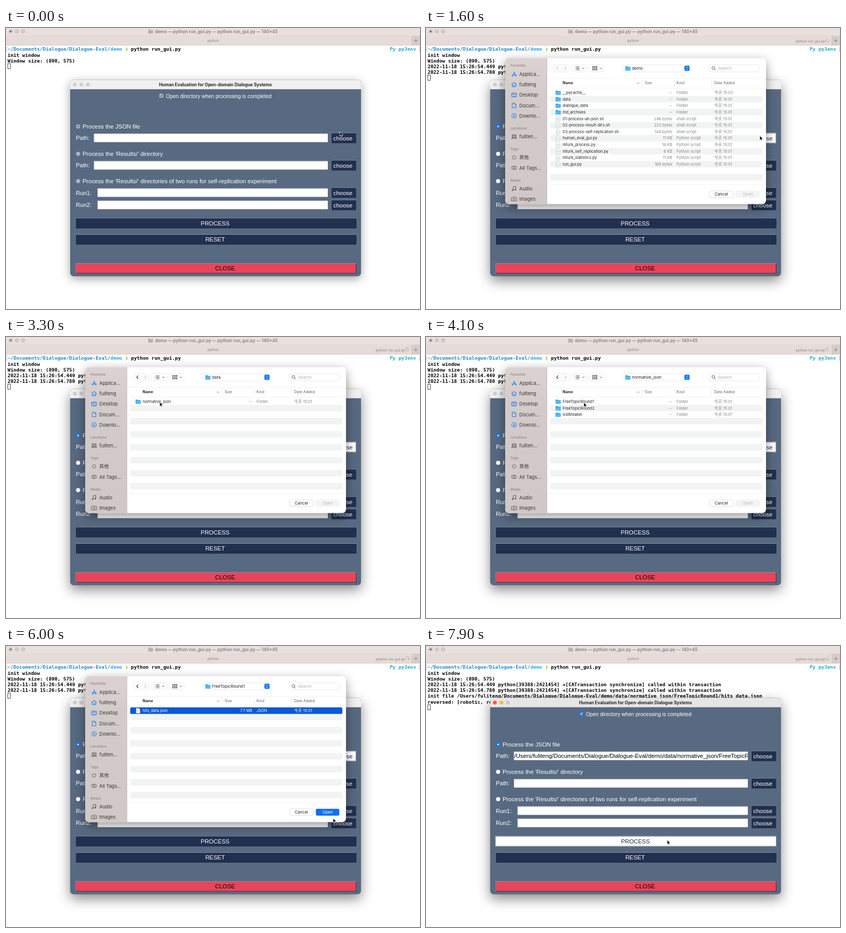
Write an HTML page that moves like this. It is 800 px wide and 545 px high and loops after 8 s.

```html
<!DOCTYPE html>
<html lang="en">
<head>
<meta charset="utf-8">
<title>Dialogue evaluation demo</title>
<style>
  html, body { margin: 0; width: 100%; height: 100%; overflow: hidden; background: #fff; }
  svg { display: block; width: 800px; height: 545px; }
  text { font-family: Inter, "Noto Sans CJK SC", "Noto Sans CJK", sans-serif; white-space: pre; }
  .mono { font: bold 9.44px "DejaVu Sans Mono", monospace; }
  .gui { font: 11.36px "Liberation Sans", Arial, sans-serif; fill: #fff; }
  .note { font-size: 10.1px; }
  .dark { fill: #1c2a48; }
  .title { font-size: 8.25px; font-weight: 700; }
  .tab { font-size: 6.8px; fill: #8d8583; }
  .side { font-size: 9.2px; fill: #3a3534; }
  .label { font-size: 6.7px; font-weight: 600; fill: #968d8b; }
  .row { font-size: 7.5px; fill: #222; }
  .dim { fill: #858585; }
  .head { font-size: 7.1px; fill: #606060; }
  .ui { font-size: 7.9px; fill: #222; }
  .mid { text-anchor: middle; }
  .end { text-anchor: end; }
  .line { fill: none; stroke-linecap: round; stroke-linejoin: round; }
  .idle { filter: drop-shadow(0 5px 9px rgba(0,0,0,.36)); }
  .front { filter: drop-shadow(0 9px 12px rgba(0,0,0,.46)); }
  .sheet { filter: drop-shadow(0 6px 10px rgba(0,0,0,.42)); }
</style>
</head>
<body>
<svg id="stage" viewBox="0 0 800 545"></svg>
<script>
const LOOP = 8000, STEP = 100;
const USER = 'fuliteng';
const T = { focus: 500, choose: 1200, second: 1500, open: 1600, pickData: 2700, data: 2900,
  pickNorm: 3400, norm: 3600, pickRound: 4400, round: 4600, pickHits: 5000,
  shut: 6400, path: 7000, run: 7600 };

// Shape helpers
const text = (x, y, s, cls, extra = '') => `<text x="${x}" y="${y}" class="${cls}" ${extra}>${s}</text>`;
const rect = (x, y, w, h, fill, extra = '') =>
  `<rect x="${x}" y="${y}" width="${w}" height="${h}" fill="${fill}" ${extra}/>`;
const dot = (x, y, r, fill, extra = '') => `<circle cx="${x}" cy="${y}" r="${r}" fill="${fill}" ${extra}/>`;
const line = (d, color, w = 1) => `<path class="line" d="${d}" stroke="${color}" stroke-width="${w}"/>`;
const during = (spans, body) => `<g data-on="${spans}">${body}</g>`;
const span = (from, to = LOOP) => `${from}-${to}`;

// Terminal
const rowY = i => 44.3 + 11.22 * i;
const out = (i, s) => text(3, rowY(i), s, 'mono');
const caret = (i, from, to) =>
  during(span(from, to), rect(3.5, rowY(i) - 9, 5, 10, 'none', 'stroke="#333" stroke-width=".9"'));
const call = ms => `2022-11-18 15:26:54.${ms} python[39388:2421454] +[CATransaction synchronize] called within transaction`;

function terminal() {
  const spokes = Array.from({ length: 8 }, (_, i) =>
    `<path d="M776 22.2V20" stroke="#7d7573" stroke-width=".9" opacity="${.25 + i * .1}" transform="rotate(${i * 45} 776 24.3)"/>`).join('');
  return rect(0, 0, 800, 545, '#fff') + rect(0, 0, 800, 34, '#e5dbd9') + rect(0, 0, 800, 14, '#e9e0de') +
    rect(785, 15, 15, 19, '#d6ccca') + rect(784, 15, .7, 19, '#c3b9b7') + rect(0, 33.5, 800, .6, '#d2c8c6') +
    [9, 21, 33].map(x => dot(x, 6.6, 3.6, '#d3c9c7', 'stroke="#bdb3b1" stroke-width=".6"')).join('') +
    dot(9, 6.6, 1.5, '#4f4847') +
    '<path d="M275 3h3.5l1 1.2h4.500v6.600h-9z" fill="#b9afad"/>' +
    text(406.5, 9.7, 'demo — python run_gui.py — python run_gui.py — 140×45', 'title mid', 'fill="#908886"') +
    text(400.5, 27, 'python', 'tab mid') +
    line('M789 24.500h6M792 21.500v6', '#7d7573', .8) +
    during(span(T.second), text(714.5, 27.5, 'python run_gui.py', 'tab', 'style="font-size:6.7px"') + `<g id="spin">${spokes}</g>`) +
    line('M2.5 37H1v8h1.500M798 37h1.500v8h-1.500', '#b0b0b0', .8) +
    text(3, rowY(0), '~/Documents/Dialogue/Dialogue-Eval/', 'mono', 'fill="#2089cf"') +
    text(201.8, rowY(0), 'demo', 'mono', 'fill="#30a5ee"') +
    text(230.2, rowY(0), '❯', 'mono', 'fill="#6cc02c"') +
    text(241.5, rowY(0), 'python run_gui.py', 'mono') +
    text(741.4, rowY(0), 'Py py3env', 'mono', 'fill="#28a9c8"') +
    out(1, 'init window') + out(2, 'Window size: (890, 575)') +
    during(span(T.choose), out(3, call(449))) +
    during(span(T.second), out(4, call(780))) +
    during(span(T.run), out(5, `init file /Users/${USER}/Documents/Dialogue/Dialogue-Eval/demo/data/normative_json/FreeTopicRound1/hits_data.json`) +
      out(6, 'reversed: [robotic, re')) +
    caret(3, 0, T.choose) + caret(4, T.choose, T.second) + caret(5, T.second, T.run) + caret(7, T.run);
}

// Form window
function button(x, y, w, label, fill = '#21304f', cls = 'gui') {
  return rect(x, y, w, 20, '#909baa') + rect(x + .8, y + .8, w - .8, 19.2, '#18233b') +
    rect(x + .8, y + .8, w - 1.6, 18.4, fill) + text(x + w / 2 - 1.4, y + 14, label, cls + ' mid');
}
const pressed = (x, y, w, label) =>
  rect(x - .5, y - .3, w + .5, 20.6, '#a9a9a9') + rect(x + 1, y + 1.200, w - 2, 17.6, '#fff') +
  text(x + w / 2 - .8, y + 14.3, label, 'gui dark mid');
const input = (x, y) => rect(x - .5, y - .5, 622.5 - x, 17, '#a6a6a6') + rect(x + .4, y + .4, 621.4 - x, 15.8, '#fff');
const choose = y => button(628, y, 48.6, 'choose');
const lights = colors => colors.map((c, i) => dot(133 + i * 12.6, 109.7, 3.8, c)).join('');
const frame = cls => `<rect class="${cls}" x="124" y="100.500" width="562" height="381" rx="6.500" fill="#586a82"/>`;
const bar = fill => `<path d="M124 118.700V107a6.500 6.500 0 0 1 6.500-6.500h549a6.500 6.500 0 0 1 6.500 6.500v11.700z" fill="${fill}"/>`;

function controls(on, off, mark) {
  return rect(296.3, 127.5, 7.800, 7.800, on, 'rx="1.700"') + line('M298.300 131.500l1.400 1.700 2.500-3.800', mark, 1.100) +
    dot(139.4, 191, 4, on) + dot(139.4, 191, 1.5, mark) + dot(139.4, 244, 4, off) + dot(139.4, 297, 4, off);
}

function form() {
  const active = `${span(T.focus, T.second)},${span(T.path)}`;
  const inactive = `${span(0, T.focus)},${span(T.second, T.path)}`;
  const grey = '#d0cecf';
  return during(span(0, T.focus), frame('idle')) + during(span(T.focus), frame('front')) +
    during(inactive, bar('#f1f0f0') + lights([grey, grey, grey])) +
    during(active, bar('#e8e5e6') + lights(['#fc5b54', '#fdba2d', '#cbc8c9'])) +
    text(404.8, 112.6, 'Human Evaluation for Open-domain Dialogue Systems', 'title mid', 'fill="#222"') +
    during(span(0, T.focus), controls('#abb3bd', '#abb3bd', '#5d6876')) +
    during(span(T.focus), controls('#1479f3', '#fff', '#fff')) +
    text(309, 135.8, 'Open directory when processing is completed', 'gui note') +
    text(148, 195.3, 'Process the JSON file', 'gui') +
    text(135, 217.3, 'Path:', 'gui') + input(170, 205) + choose(203.5) +
    text(148, 248.4, "Process the 'Results/' directory", 'gui') +
    text(135, 270.4, 'Path:', 'gui') + input(170, 258.2) + choose(256.5) +
    text(148, 301.3, "Process the 'Results/' directories of two runs for self-replication experiment", 'gui') +
    text(135, 323.6, 'Run1:', 'gui') + input(177, 311.200) + choose(309.5) +
    text(135, 347.3, 'Run2:', 'gui') + input(177, 335) + choose(333.5) +
    button(134, 368.7, 543, 'PROCESS') + button(134, 400.2, 543, 'RESET') +
    button(134, 456.200, 543, 'CLOSE', '#e8455a', 'gui" style="fill:#000" data-k="') +
    during(span(T.choose, T.path), pressed(628, 203.5, 48.6, 'choose')) +
    during(span(T.path), `<g clip-path="url(#field)">` +
      text(170.7, 217.1, `/Users/${USER}/Documents/Dialogue/Dialogue-Eval/demo/data/normative_json/FreeTopicRound1/hits_data.json`, 'gui', 'style="fill:#000"') + '</g>') +
    during(span(T.run), pressed(134, 368.7, 543, 'PROCESS'));
}

// File chooser
const folder = (x, y) => `<path d="M${x} ${y - 4}h3.800l1 1.200h5v7h-9.800z" fill="#2f9fe0"/>` +
  rect(x, y - 1.6, 9.8, 5.8, '#56b9f1', 'rx=".8"');
const sheet = (x, y) => `<path d="M${x} ${y - 4.700}h5l2.500 2.500v7h-7.500z" fill="#fff" stroke="#b5b5b5" stroke-width=".7"/>` +
  line(`M${x + 1.700} ${y - .500}h4m-4 2h4`, '#a5a5a5', .6);
const file = (name, size, kind, time = '15:01') => ({ name, size, kind, time });
const dir = (name, time) => file(name, '--', 'Folder', time);
const sh = (name, n) => file(name, n + ' bytes', 'shell script');
const py = (name, size) => file(name, size, 'Python script');

function entry(f, i, picked) {
  const y = 125.4 + 12.62 * i, base = y + 2.7, hot = picked ? 'style="fill:#fff"' : '';
  return (picked ? rect(240, y - 6.3, 410, 12.6, '#0a58d8', 'rx="2.800"') : '') +
    (f.kind === 'Folder' ? folder(250.5, y) : sheet(251.5, y)) +
    text(264, base, f.name, 'row', hot) + text(476, base, f.size, 'row dim end', hot) +
    text(484, base, f.kind, 'row dim', hot) + text(557, base, `今天 ${f.time}`, 'row dim', hot);
}

function listing(name, from, pick, to, files, target) {
  const open = rect(599, 316, 45, 12.8, '#f5f5f5', 'rx="3" stroke="#e6e6e6" stroke-width=".6"') +
    text(621.5, 325.2, 'Open', 'ui mid', 'style="fill:#b8b8b8"');
  const ready = rect(598.7, 315.7, 45.5, 13.200, '#0d6ff2', 'rx="3"') + text(621.5, 325.2, 'Open', 'ui mid', 'style="fill:#fff"');
  return during(span(from, to), text(398, 81, name, 'ui') + files.map((f, i) => entry(f, i)).join('')) +
    during(span(from, pick), open) + during(span(pick, to), ready + entry(files[target], target, true));
}

const blue = '#1677ee', ink = '#5d5654';
const icons = {
  app: y => line(`M167 ${y + 4}l4-8M166 ${y + 1.500}h9M170 ${y - 4}l4 8`, blue, 1.100),
  home: y => line(`M165.500 ${y}l4.700-4.200 4.700 4.200M167 ${y}v4h6.400v-4M170.200 ${y + 4}v-3`, blue, 1.100),
  desk: y => rect(165.5, y - 3.8, 9.4, 7.600, 'none', `rx="1" stroke="${blue}"`) + line(`M166 ${y - 1.700}h8.500M168 ${y + 2}h4.500`, blue),
  doc: y => line(`M167 ${y - 4.500}h4l2.700 2.700v6.300h-6.700zM171 ${y - 4.500}v2.700h2.700`, blue),
  down: y => dot(170.2, y, 4.5, 'none', `stroke="${blue}"`) + line(`M170.200 ${y - 2.300}v4.500m-1.800-1.700l1.800 1.700 1.800-1.700`, blue),
  disk: y => rect(166.5, y - 3.5, 7.6, 5.600, '#a59d9b', `stroke="${ink}" stroke-width=".8"`) + line(`M165 ${y + 3.500}h10.500`, ink),
  tag: y => dot(170.2, y, 3.4, 'none', `stroke="${ink}" stroke-width=".9"`),
  tags: y => dot(168.6, y, 3.3, 'none', `stroke="${ink}" stroke-width=".9"`) + dot(171.6, y, 3.300, 'none', `stroke="${ink}" stroke-width=".9"`),
  note: y => line(`M168.500 ${y + 3}v-6.500l5-1v6.500`, ink) + dot(167.3, y + 3, 1.500, ink) + dot(172.3, y + 2, 1.5, ink),
  camera: y => line(`M165.300 ${y - 2.500}h2.500l1-1.500h3l1 1.500h2.500v6.300h-10z`, ink, .9) + dot(170.3, y + .5, 1.9, 'none', `stroke="${ink}" stroke-width=".9"`)
};

function sidebar() {
  const items = [['app', 89.8, 'Applica...'], ['home', 109.8, USER], ['desk', 130, 'Desktop'], ['doc', 150.2, 'Docum...'],
    ['down', 170.3, 'Downlo...'], ['disk', 210.6, USER.slice(0, 7) + '...'], ['tag', 251, '其他'], ['tags', 271.2, 'All Tags...'],
    ['note', 311.4, 'Audio'], ['camera', 331.5, 'Images']];
  const labels = [[75.4, 'Favorites'], [196.9, 'Locations'], [237.3, 'Tags'], [297.7, 'Media']];
  return '<path d="M234 58.500h-74a7 7 0 0 0-7 7v269a7 7 0 0 0 7 7h74z" fill="url(#side)"/>' +
    rect(233.5, 58.5, .7, 283, '#c2b9b7') + labels.map(([y, s]) => text(163, y, s, 'label')).join('') +
    items.map(([k, y, s]) => icons[k](y) + text(180.3, y + 3.3, s, 'side')).join('');
}

function chooser() {
  const box = (x, w) => rect(x, 71.3, w, 13.6, '#fff', 'rx="3" stroke="#e1e1e1" stroke-width=".7"');
  const chevron = x => line(`M${x - 1.800} 77.300l1.800 1.800 1.800-1.800`, '#444', .9);
  const back = c => line('M255.300 75l-2.800 3.100 2.800 3.100', c, 1.100);
  const stripes = Array.from({ length: 7 }, (_, i) => rect(240, 131.7 + i * 25.24, 410, 12.6, '#f2f4f4', 'rx="2.800"')).join('');
  const grid = [0, 1, 2].map(c => [0, 1].map(r => rect(321.5 + c * 3.5, 74 + r * 4.6, 2.500, 2.500, '#555') +
    rect(321.5 + c * 3.5, 77.2 + r * 4.600, 2.5, .7, '#555')).join('')).join('');
  const root = [dir('__pycache__', '15:03'), dir('data'), dir('dialogue_data'), dir('md_archives'),
    sh('01-process-all-json.sh', 246), sh('02-process-result-dirs.sh', 223), sh('03-process-self-replication.sh', 144),
    py('human_eval_gui.py', '11 KB'), py('mturk_process.py', '16 KB'), py('mturk_self_replication.py', '6 KB'),
    py('mturk_statistics.py', '11 KB'), py('run_gui.py', '169 bytes')];
  const rounds = [dir('FreeTopicRound1'), dir('FreeTopicRound2'), dir('IceBreaker')];
  return during(span(T.open, T.shut),
    '<rect class="sheet" x="153" y="58.500" width="504" height="283" rx="7" fill="#fff"/>' + sidebar() +
    box(247, 29.5) + rect(261.5, 73, .7, 10, '#e5e5e5') + line('M268 75l2.800 3.100-2.800 3.100', '#bdbdbd', 1.100) +
    during(span(0, T.data), back('#bdbdbd')) + during(span(T.data), back('#222')) +
    box(281.5, 29.5) + line('M290.500 75.200h5.500m-5.500 2.900h5.500m-5.500 2.900h5.500M288 75.200h.1m-.1 2.900h.1m-.1 2.900h.1', '#444', 1.100) + chevron(304) +
    box(315.5, 28.5) + grid + chevron(338) + box(380, 131.5) + folder(385.3, 78.2) +
    rect(499.3, 73, 10, 10.3, '#1275f5', 'rx="2.300"') + line('M502.500 76.800l1.800-1.800 1.800 1.800m-3.600 2.800l1.800 1.800 1.800-1.800', '#fff', .9) +
    box(547, 97) + dot(555.3, 77.5, 2.7, 'none', 'stroke="#444" stroke-width=".9"') + line('M557.300 79.700l2.200 2.200', '#444', .9) +
    text(564.3, 81, 'Search', 'ui', 'style="fill:#b0b0b0"') +
    rect(234, 97.6, 423, .6, '#e6e6e6') + rect(240, 116, 410, .6, '#e6e6e6') + rect(234, 302.8, 423, .6, '#e9e9e9') +
    text(264, 109.4, 'Name', 'head', 'style="font-weight:700;fill:#222"') + line('M408 108l2-2 2 2', '#666', .8) +
    [[418, 'Size', 422.5], [479.5, 'Kind', 484], [551.5, 'Date Added', 557]].map(([x, s, tx]) =>
      rect(x, 101, .7, 12, '#dedede') + text(tx, 109.4, s, 'head')).join('') + stripes +
    rect(548, 316, 45.5, 12.8, '#fff', 'rx="3" stroke="#d5d5d5" stroke-width=".8"') + text(570.8, 325.2, 'Cancel', 'ui mid') +
    listing('demo', T.open, T.pickData, T.data, root, 1) +
    listing('data', T.data, T.pickNorm, T.norm, [dir('normative_json')], 0) +
    listing('normative_json', T.norm, T.pickRound, T.round, rounds, 0) +
    listing('FreeTopicRound1', T.round, T.pickHits, T.shut, [file('hits_data.json', '7.7 MB', 'JSON')], 0));
}

const stage = document.getElementById('stage');
stage.innerHTML = `<defs>
  <clipPath id="field"><rect x="170" y="205" width="451.500" height="16.500"/></clipPath>
  <linearGradient id="side" x1="0" y1="0" x2="0" y2="1"><stop stop-color="#dcd3d1"/><stop offset=".25" stop-color="#d3cbca"/><stop offset="1" stop-color="#cfc8c7"/></linearGradient>
  </defs>` + terminal() + form() + chooser() +
  '<path id="pointer" d="M0 0V8.600L2 6.900 3.300 9.800 4.900 9.100 3.600 6.300H6.300Z" fill="#000" stroke="#fff" stroke-width=".8" stroke-linejoin="round"/>';

// Pointer stops: time, x, y
const stops = [[0, 645, 201], [300, 645, 201], [800, 645, 209], [1700, 645, 209], [2500, 294, 139], [2900, 294, 139],
  [3300, 297, 126], [3700, 297, 126], [4000, 305, 127], [5100, 305, 127], [6000, 632, 334], [6300, 623, 321],
  [6800, 623, 321], [7500, 466, 376], [LOOP, 466, 376]];

function pointerAt(t) {
  const i = stops.findIndex((s, k) => k && t <= s[0]);
  const [t0, x0, y0] = stops[i - 1], [t1, x1, y1] = stops[i];
  const u = (t - t0) / (t1 - t0), e = u * u * (3 - 2 * u);
  return [x0 + (x1 - x0) * e, y0 + (y1 - y0) * e];
}

const timed = [...stage.querySelectorAll('[data-on]')].map(el => ({
  el, spans: el.dataset.on.split(',').map(s => s.split('-').map(Number))
}));
const pointer = document.getElementById('pointer'), spin = document.getElementById('spin');
const start = performance.now();

function draw(now) {
  const t = Math.floor(Math.max(0, now - start) % LOOP / STEP) * STEP;
  for (const { el, spans } of timed)
    el.style.display = spans.some(([a, b]) => t >= a && t < b) ? '' : 'none';
  pointer.setAttribute('transform', `translate(${pointerAt(t)})`);
  spin.setAttribute('transform', `rotate(${t / STEP * 45} 776 24.3)`);
  requestAnimationFrame(draw);
}
draw(start);
</script>
</body>
</html>
```
